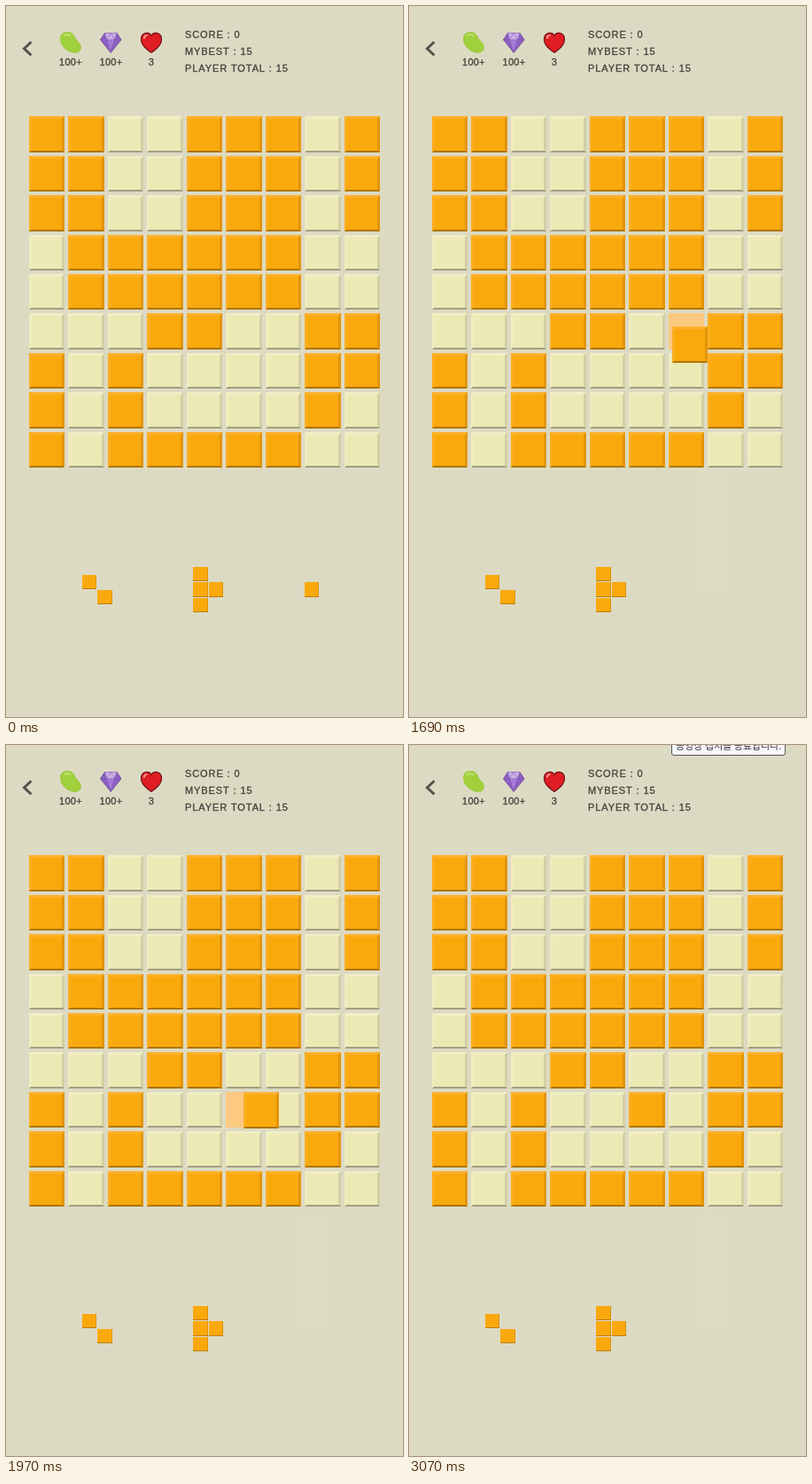
An HTML page with a canvas that plays this animation: 448x801 px, repeating every 3.27 s.

```html
<!DOCTYPE html>
<html lang="en">
<head>
<meta charset="utf-8">
<title>Block puzzle</title>
<style>
  html, body { margin: 0; width: 100%; height: 100%; overflow: hidden; background: #dddac3; }
  canvas { display: block; width: 100vw; height: 100vh; }
</style>
</head>
<body>
<canvas id="stage" width="448" height="801"></canvas>
<script>
const ctx = document.getElementById('stage').getContext('2d');
const LOOP = 3270, PICK = 1390, DROP = 2270, NOTICE = 3070;
const PITCH = 44.45, CELL = 40.45, TRAY_PITCH = 17.4, TRAY_CELL = 16.4;
const ROWS = ['110011101', '110011101', '110011101', '011111100', '011111100',
              '000110011', '101000011', '101000010', '101111100'];
const ORANGE = { face: '#faa90d', top: '#fdb22c', left: '#fbae20', right: '#e2950a', bottom: '#ad7508' };
const CREAM = { face: '#ece9b5', top: '#f1eec6', left: '#efecbf', right: '#d2cfa5', bottom: '#a19e82' };

// Drag positions: start time, block corner, hovered cell (column, row)
const DRAG = [
  { at: 1390, x: 325, y: 382 },
  { at: 1490, x: 326, y: 320, over: [7, 4] },
  { at: 1590, x: 314, y: 336, over: [6, 5] },
  { at: 1690, x: 297, y: 361, over: [6, 5] },
  { at: 1780, x: 282, y: 380, over: [6, 6] },
  { at: 1970, x: 268, y: 391, over: [5, 6] },
  { at: 2070, x: 261, y: 397, over: [5, 6] }
];

// Rounds the edges of a square to whole pixels: [x, y, width, height]
function snap(x, y, size) {
  const left = Math.round(x), top = Math.round(y);
  return [left, top, Math.round(x + size) - left, Math.round(y + size) - top];
}

const cellBox = (col, row) => snap(26 + PITCH * col, 124.2 + PITCH * row, CELL);

function rect(color, x, y, w, h) {
  ctx.fillStyle = color;
  ctx.fillRect(x, y, w, h);
}

function poly(color, ...points) {
  ctx.fillStyle = color;
  ctx.beginPath();
  points.forEach(([x, y]) => ctx.lineTo(x, y));
  ctx.fill();
}

function shape(d, fill, stroke, width = 1) {
  const path = new Path2D(d);
  if (fill) { ctx.fillStyle = fill; ctx.fill(path); }
  if (stroke) { ctx.strokeStyle = stroke; ctx.lineWidth = width; ctx.stroke(path); }
}

function text(str, x, y, { font, color = '#45443e', align = 'left', spacing = 0, weight = 0 }) {
  ctx.font = font;
  ctx.fillStyle = ctx.strokeStyle = color;
  ctx.textAlign = align;
  ctx.letterSpacing = spacing + 'px';
  ctx.fillText(str, x, y);
  if (weight) {
    ctx.lineWidth = weight;
    ctx.strokeText(str, x, y);
  }
}

function block(x, y, w, h, c) {
  const b = 3;
  rect(c.face, x, y, w, h);
  poly(c.top, [x, y], [x + w, y], [x + w - b, y + b], [x + b, y + b]);
  poly(c.left, [x, y], [x + b, y + b], [x + b, y + h - b], [x, y + h]);
  poly(c.right, [x + w, y], [x + w, y + h], [x + w - b, y + h - b], [x + w - b, y + b]);
  poly(c.bottom, [x, y + h], [x + 2, y + h - 2], [x + w - 2, y + h - 2], [x + w, y + h]);
}

function piece(x, y, ...cells) {
  for (const [col, row] of cells) {
    const [left, top, w, h] = snap(x + TRAY_PITCH * col, y + TRAY_PITCH * row, TRAY_CELL);
    rect('#faa90d', left, top, w, h);
    rect('#db930b', left + w - 1, top, 1, h);
    rect('#b87f0c', left, top + h - 1, w, 1);
  }
}

function header() {
  ctx.lineJoin = 'miter';
  shape('M28.5 40.5 L20.5 48 L28.5 55.5', null, '#53524c', 3);
  ctx.lineJoin = 'round';

  shape('M66 30 C70 28.5 76 30 77.5 35 C78.5 39 84 41 84.5 46 C85 51 80 54 74 52 C67 50 61.5 44 61.5 37 C61.5 33 63 31 66 30Z',
        '#a0d03c', '#98c83c', .8);
  shape('M65 34 C67 31.5 71 31.5 73 34', null, '#bfe472', 2);

  shape('M111.5 30.5 H125 L130 38 L118.2 52.5 L106.5 38Z', '#8f5fc4', '#6b469f', .9);
  shape('M111.5 30.5 H125 L122.5 38 H113.5Z', '#cdb2e8');
  shape('M113.5 38 H122.5 L118 52Z', '#a67ad6');
  shape('M106.5 38 H130 M111.5 30.5 L113.5 38 L118 30.5 L122.5 38 L125 30.5 M113.5 38 L118 52.5 L122.5 38',
        null, '#7a56ad', .6);

  shape('M164 52.5 C159 49 152.5 44.5 152.5 37.5 C152.5 29.5 161.5 28.5 164 33.5 C166.5 28.5 175.5 29.5 175.5 37.5 C175.5 44.5 169 49 164 52.5Z',
        '#df1d22', '#74151a', 1.2);
  shape('M155.8 37 C155.8 34.5 157.5 33 159.5 33', null, '#ff8d88', 2);

  const label = { font: '11px "Liberation Sans", Arial, sans-serif', align: 'center', spacing: .3, weight: .35 };
  text('100+', 73, 67, label);
  text('100+', 118.5, 67, label);
  text('3', 164, 67, label);

  const score = { ...label, align: 'left', spacing: .9 };
  text('SCORE : 0', 202, 36, score);
  text('MYBEST : 15', 202, 55, score);
  text('PLAYER TOTAL : 15', 202, 74, score);
}

function board() {
  ROWS.forEach((row, r) => [...row].forEach((cell, c) =>
    block(...cellBox(c, r), cell === '1' ? ORANGE : CREAM)));
}

function tray(t) {
  piece(86, 640.6, [0, 0], [1, 1]);
  piece(211.2, 632, [0, 0], [0, 1], [1, 1], [0, 2]);
  if (t < PICK) piece(336.8, 649.4, [0, 0]);
  else rect('#dedbc5', 322, 521, 42, 144);
}

function dragged(t) {
  if (t < PICK) return;
  if (t >= DROP) return block(...cellBox(5, 6), ORANGE);
  const { x, y, over } = DRAG.findLast(step => t >= step.at);
  if (over) rect('#fcc980', ...cellBox(...over));
  block(x, y, 40, 41, ORANGE);
}

function notice() {
  ctx.beginPath();
  ctx.roundRect(296.5, -12, 128, 23.5, 2.5);
  ctx.fillStyle = '#f8f8fa';
  ctx.fill();
  ctx.strokeStyle = '#55555a';
  ctx.lineWidth = 1;
  ctx.stroke();
  text('동영상 캡처를 종료합니다.', 301, 5,
       { font: '11px "Noto Sans CJK KR", "Noto Sans CJK", sans-serif', color: '#333338' });
}

function draw(now) {
  const t = now % LOOP;
  rect('#dddac3', 0, 0, 448, 801);
  header();
  board();
  tray(t);
  dragged(t);
  if (t >= NOTICE) notice();
}

const start = performance.now();
function tick() {
  draw(performance.now() - start);
  requestAnimationFrame(tick);
}
tick();
</script>
</body>
</html>
```
